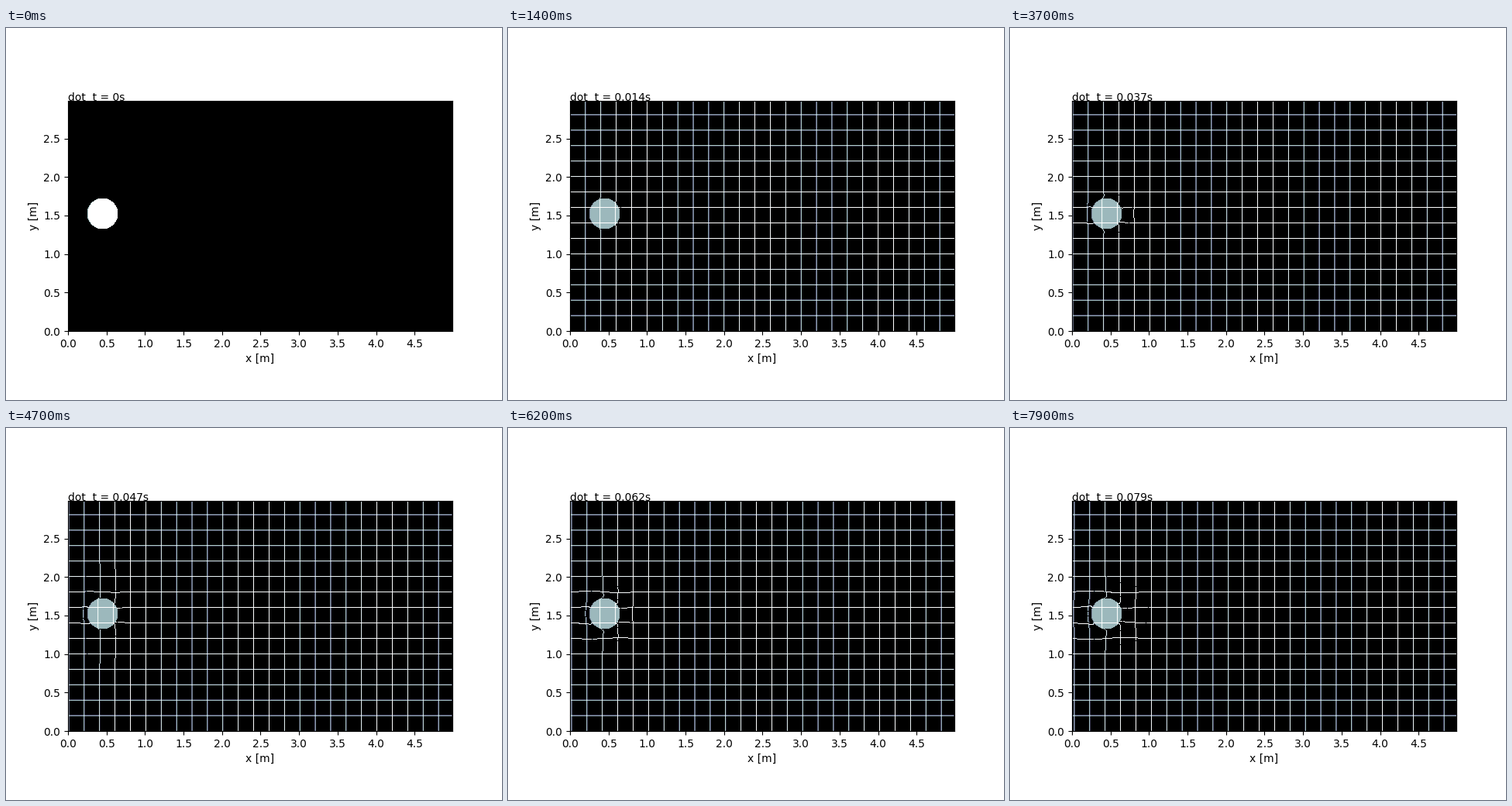
Write a matplotlib script that moves like this. It is 640 by 480 pixels and loops after 8 s.

```python
import numpy as np
import matplotlib.pyplot as plt
from matplotlib.animation import FuncAnimation

W, H, DX, DT = 5.0, 3.0, 0.01, 0.001
NX, NY, STEP = 500, 300, 20
FRAMES = 80
SPEED = 0.5
CENTRE, RADIUS = 0.45 + 1.52j, 0.2
STRENGTH, RISE = 0.041, 0.015


def velocity(z, t):
    """Flow past a row of cylinders, periodic along x, at rest inside."""
    d = z - CENTRE
    d = d.real - W * np.round(d.real / W) + 1j * d.imag
    gap = np.abs(d) - RADIUS
    out = gap > 0
    v = np.zeros_like(z)
    k = np.pi / W
    dipole = STRENGTH * (1 - np.exp(-t / RISE))
    w = SPEED * (1 - dipole * k**2 / np.sin(k * d[out])**2)
    v[out] = np.conj(w) * (1 - np.exp(-gap[out] / 0.012))
    return v


def seed_lines():
    """Tracer particles along grid lines, one per node."""
    cols, rows = np.arange(NX), np.arange(NY)
    vx, vy = np.meshgrid(cols[::STEP], rows)
    hx, hy = np.meshgrid(cols, rows[STEP::STEP])
    x = np.concatenate([vx.ravel(), hx.ravel()])
    y = np.concatenate([vy.ravel(), hy.ravel()])
    return (x + 1j * y) * DX


def trace(z, steps):
    path = [z]
    for n in range(steps):
        z = z + velocity(z, (n + 0.5) * DT) * DT
        z = z.real % W + 1j * z.imag
        path.append(z)
    return path


gx, gy = np.meshgrid(np.arange(NX) * DX, np.arange(NY) * DX)
disc = np.abs(gx + 1j * gy - CENTRE) < RADIUS - 1e-9
path = trace(seed_lines(), FRAMES - 1)


def picture(n):
    if n == 0:
        return disc.astype(float)
    img = 0.7 * disc
    z = path[n] / DX
    i = np.clip(np.floor(z.real - 0.5).astype(int), 0, NX - 1)
    j = np.clip(np.round(z.imag).astype(int), 0, NY - 1)
    img[j, i] = 1
    return img


fig, ax = plt.subplots(figsize=(6.4, 4.8), dpi=100)
# Pixels are centred on the nodes; the view ends at the outermost nodes.
half = DX / 2
im = ax.imshow(picture(0), cmap="bone", vmin=0, vmax=1, origin="lower",
               extent=(-half, W - half, -half, H - half))
ax.set_xticks(np.arange(0, W, 0.5))
ax.set_yticks(np.arange(0, H, 0.5))
ax.set_xlim(0, W - DX)
ax.set_ylim(0, H - DX)
ax.set_xlabel("x [m]")
ax.set_ylabel("y [m]")
label = ax.text(0, H - DX, "")


def update(n):
    im.set_data(picture(n))
    label.set_text(f"dot  t = {n * DT:g}s")
    return im, label


anim = FuncAnimation(fig, update, frames=FRAMES, interval=100,
                     repeat=True, repeat_delay=0)
plt.show()
```
